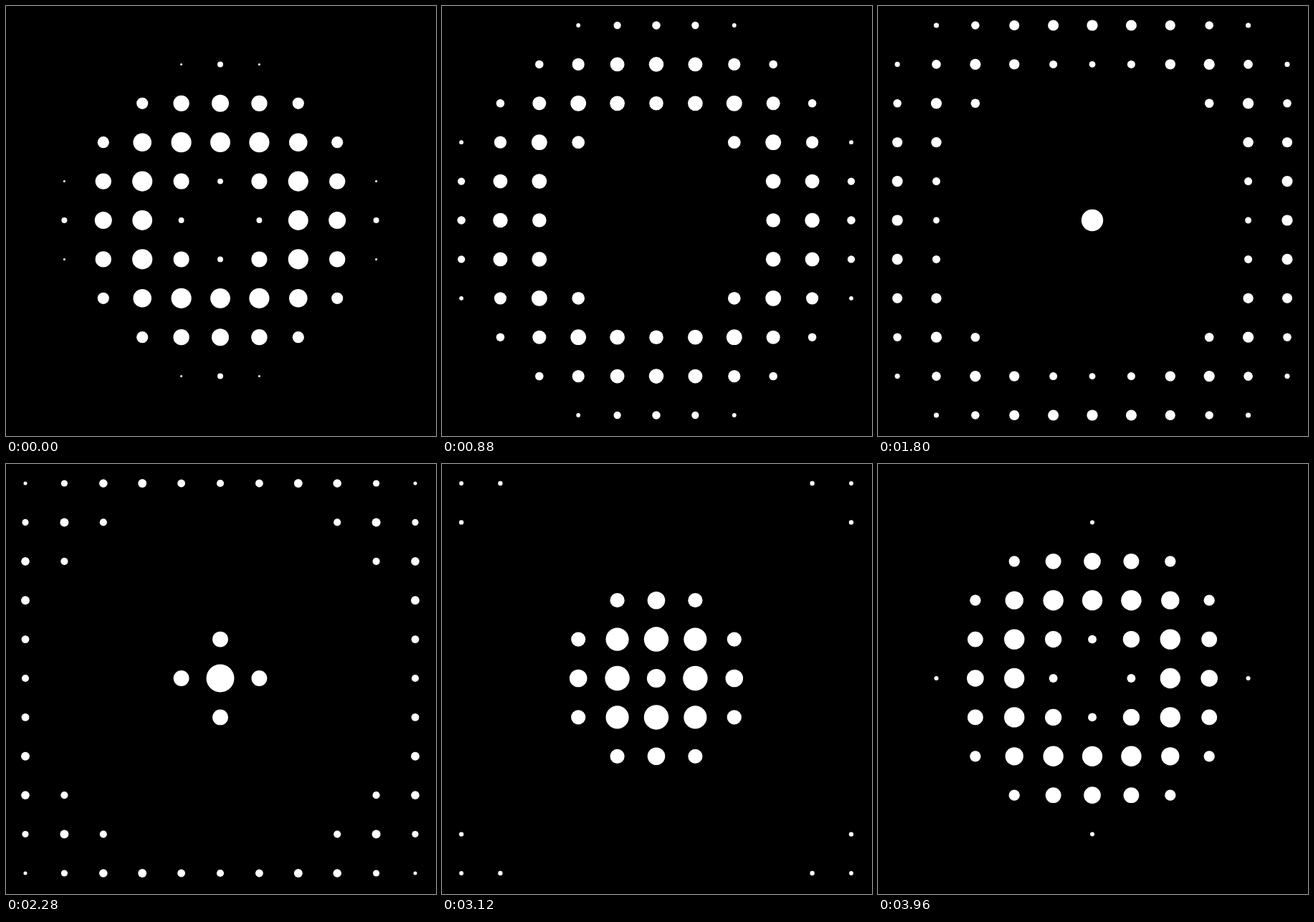
These frames come from a looping animation (600x600 px, 4 s). An HTML page with a canvas:

```html
<!DOCTYPE html>
<html lang="en">
<head>
<meta charset="utf-8">
<title>Dot wave</title>
<style>
  html, body { margin: 0; width: 100%; height: 100%; overflow: hidden; background: #000; }
  canvas { display: block; }
</style>
</head>
<body>
<canvas id="stage" width="600" height="600"></canvas>
<script>
const ctx = document.getElementById('stage').getContext('2d');
const LOOP = 4000, STEP = 40;
const CENTER = 299, SPACING = 54.4, REACH = 5;

// A ring wave runs outward; dots shrink with distance and vanish in the troughs.
function dotRadius(distance, angle) {
  const crest = Math.cos(0.985 * distance - angle - 2.51);
  return crest > 0 ? (19.65 - 2.34 * distance) * crest ** 0.48 : 0;
}

function draw(time) {
  const angle = 2 * Math.PI * Math.floor(time % LOOP / STEP) * STEP / LOOP;
  ctx.fillStyle = '#000';
  ctx.fillRect(0, 0, 600, 600);
  ctx.fillStyle = '#fff';
  for (let row = -REACH; row <= REACH; row++) {
    for (let col = -REACH; col <= REACH; col++) {
      const radius = dotRadius(Math.hypot(col, row), angle);
      if (!radius) continue;
      ctx.beginPath();
      ctx.arc(CENTER + col * SPACING, CENTER + row * SPACING, radius, 0, 2 * Math.PI);
      ctx.fill();
    }
  }
}

const start = performance.now();
function tick() {
  draw(performance.now() - start);
  requestAnimationFrame(tick);
}
tick();
</script>
</body>
</html>
```
